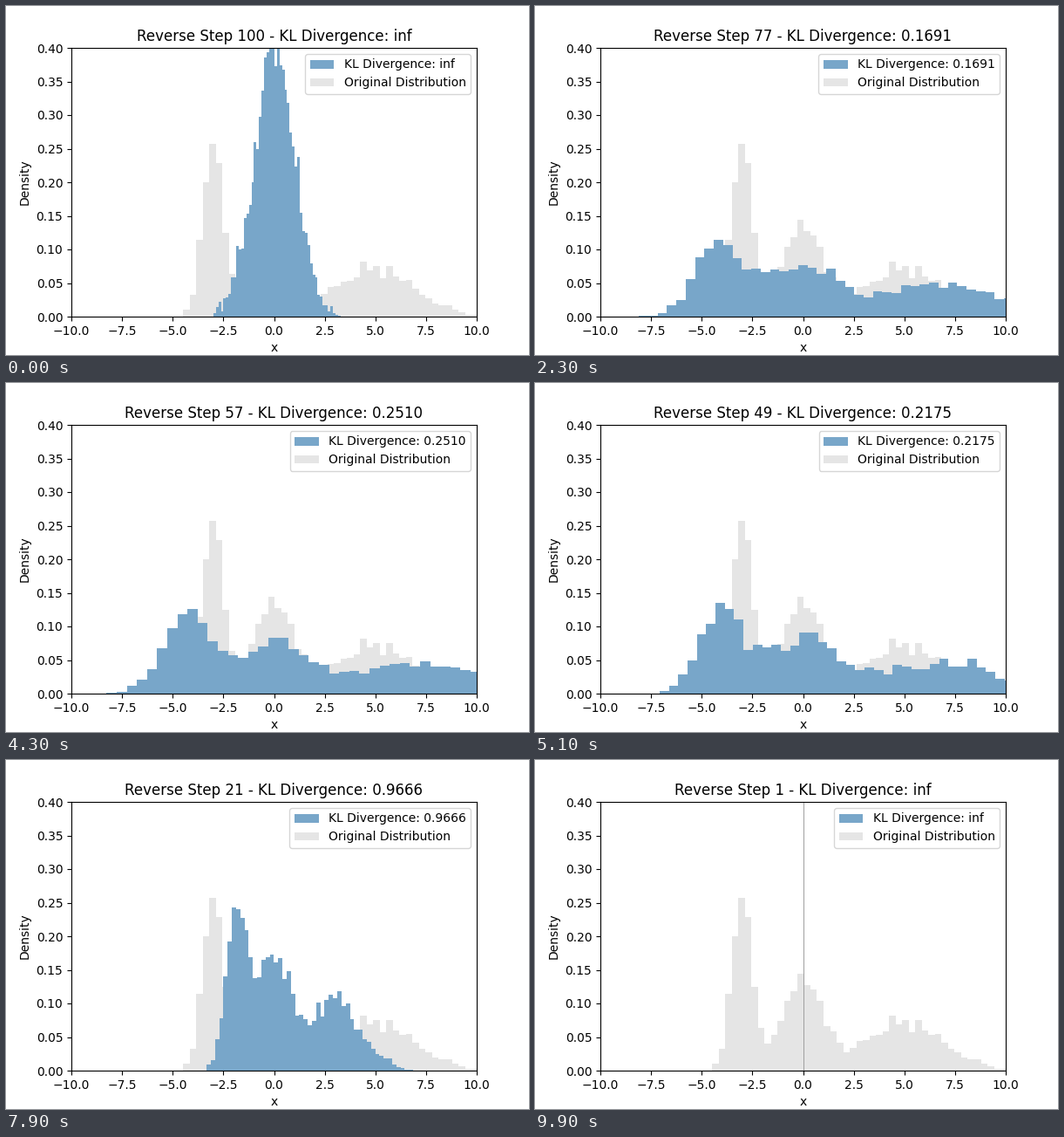
Write a matplotlib script that moves like this. It is 600 by 400 pixels and loops after 10 s.

```python
import matplotlib.pyplot as plt
import numpy as np
from matplotlib.animation import FuncAnimation

STEPS = 100
BINS = 50
SAMPLES = 5000
BLUE, GRAY = "#78a6c9", "#e5e5e5"

# Equal-weight Gaussian mixture that the reverse process should recover.
MEANS = np.array([-3.0, 0.0, 5.0])
SIGMAS = np.array([0.5, 1.0, 2.0])

# step, mixture scale, added noise, left and right end of the bins
KEYS = np.array([
    (1, 0.00, 0.00, 0.00, 0.00),
    (21, 0.60, 0.45, -3.33, 7.07),
    (35, 1.05, 0.64, -5.87, 12.43),
    (49, 1.33, 0.90, -7.08, 15.92),
    (64, 1.47, 0.90, -9.01, 16.61),
    (89, 0.90, 1.00, -5.79, 10.63),
    (100, 0.00, 1.00, -3.00, 3.28),
])
key_steps, key_vals = KEYS[:, 0], KEYS[:, 1:]
key_slopes = np.gradient(key_vals, key_steps, axis=0)

# step, divergence; interpolated on a log scale
KL = np.array([(13, 13), (21, 0.9666), (35, 0.0324), (49, 0.2175),
               (64, 0.2846), (80, 0.15), (89, 0.025), (99, 13)])


def state(step):
    """Cubic Hermite curve through the key points."""
    i = min(np.searchsorted(key_steps, step, side="right"), len(KEYS) - 1) - 1
    h = key_steps[i + 1] - key_steps[i]
    t = (step - key_steps[i]) / h
    return ((1 + 2 * t) * (1 - t) ** 2 * key_vals[i]
            + t * (1 - t) ** 2 * h * key_slopes[i]
            + t * t * (3 - 2 * t) * key_vals[i + 1]
            + t * t * (t - 1) * h * key_slopes[i + 1])


def histogram(scale, noise, lo, hi, seed):
    """Sampled bin densities of the scaled, noisy mixture."""
    edges = np.linspace(lo, hi, BINS + 1)
    width = (hi - lo) / BINS
    mid = (edges[:-1] + edges[1:])[:, None] / 2
    sd = np.hypot(SIGMAS * scale, noise)
    pdf = np.exp(-((mid - MEANS * scale) / sd) ** 2 / 2) / (sd * np.sqrt(2 * np.pi))
    counts = np.random.default_rng(seed).poisson(pdf.mean(axis=1) * width * SAMPLES)
    return counts / (SAMPLES * width), edges


def divergence(step):
    if not KL[0, 0] <= step <= KL[-1, 0]:
        return np.inf
    return np.exp(np.interp(step, KL[:, 0], np.log(KL[:, 1])))


plt.rcParams["font.family"] = "DejaVu Sans"
fig, ax = plt.subplots(figsize=(6, 4), dpi=100)
ax.set(xlabel="x", ylabel="Density")
title = ax.set_title("")
bars = ax.stairs(np.zeros(BINS), np.linspace(-1, 1, BINS + 1), fill=True,
                 color=BLUE, lw=0, zorder=1.2)
ax.stairs(*histogram(1, 0, -4.488, 11.687, seed=7), fill=True, color=GRAY,
          lw=0, zorder=1.1, label="Original Distribution")
spike = ax.axvline(0, color="#a0a0a0", lw=0.72)
ax.set(xlim=(-10, 10), ylim=(0, 0.4))


def update(frame):
    step = STEPS - frame
    scale, noise, lo, hi = state(step)
    collapsed = hi == lo
    spike.set_visible(collapsed)
    bars.set_visible(not collapsed)
    if not collapsed:
        bars.set_data(*histogram(scale, noise, lo, hi, seed=step))
    text = f"KL Divergence: {divergence(step):.4f}"
    title.set_text(f"Reverse Step {step} - {text}")
    bars.set_label(text)
    legend = ax.legend(loc="upper right")
    for patch in legend.get_patches():
        patch.set_visible(True)


anim = FuncAnimation(fig, update, frames=STEPS, interval=100, repeat=True,
                     repeat_delay=0, init_func=lambda: update(0))
plt.show()
```
